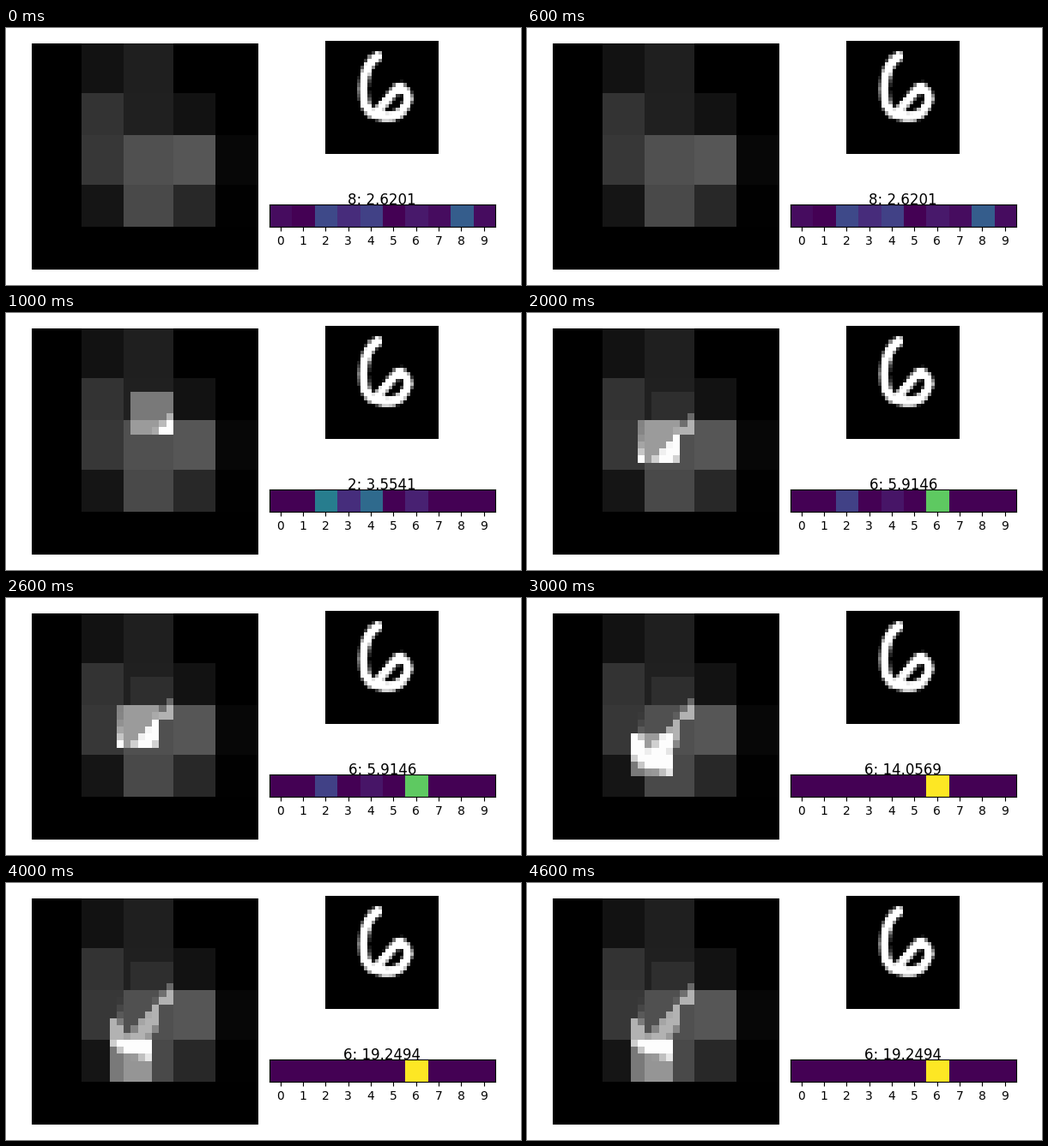
Recreate the animation shown at these times as a matplotlib script. Size 600x300 px, loop 5000 ms.

```python
import numpy as np
import matplotlib.pyplot as plt
from matplotlib.animation import FuncAnimation

N, COARSE, PATCH = 32, 5, 6
FLOOR, PEAK, LIFT = 46, 178, 75

# Pen path of the digit, in cell units (x, y)
PEN = np.array([
    (14.3, 3.9), (12.8, 5), (11.5, 7), (10.6, 10), (10.3, 13), (10.5, 15.8),
    (10.9, 17.8), (12.3, 19.8), (14.2, 20.5), (16.3, 21), (18.6, 20.9),
    (20.8, 19.8), (22.3, 17.8), (22.9, 15.8), (22.4, 14), (20.7, 12.6),
    (19.6, 13.2), (18.3, 14.6), (17.3, 16), (15.4, 18), (14.5, 19.4)])

# Top-left cell (x, y) of each glimpse after the coarse first look
GLIMPSES = [(14, 9), (12, 13), (11, 17), (11, 20)]

# Notable class scores per step; the best one is the title
SCORES = [
    {8: 2.6201, 2: 2.1, 4: 1.9, 3: 1.4, 6: 1.0, 0: 0.75, 7: 0.75, 9: 0.75},
    {2: 3.5541, 4: 3.0, 3: 1.45, 6: 1.15},
    {6: 5.9146, 2: 1.9, 4: 0.9},
    {6: 14.0569},
    {6: 19.2494},
]


def draw_digit():
    y, x = np.mgrid[:N, :N].astype(float)
    dist = np.full((N, N), np.inf)
    for (ax, ay), (bx, by) in zip(PEN[:-1], PEN[1:]):
        dx, dy = bx - ax, by - ay
        t = np.clip(((x - ax) * dx + (y - ay) * dy) / (dx**2 + dy**2), 0, 1)
        dist = np.minimum(dist, np.hypot(x - ax - t * dx, y - ay - t * dy))
    return np.clip((1.7 - dist) / 0.8, 0, 1)


def first_look(digit):
    """Shrink with a triangle filter, then enlarge to blocks again."""
    step = N / COARSE
    centers = (np.arange(COARSE)[:, None] + 0.5) * step
    k = np.clip(1 - np.abs(np.arange(N) + 0.5 - centers) / step, 0, 1)
    k /= k.sum(axis=1, keepdims=True)
    block = np.arange(N) * COARSE // N
    return PEAK * (k @ digit @ k.T)[np.ix_(block, block)]


def view(step):
    """Blocks sharpened at each glimpse so far, the current one lifted."""
    img = base.copy()
    for i, (x, y) in enumerate(GLIMPSES[:step], start=1):
        box = np.s_[y:y + PATCH, x:x + PATCH]
        img[box] = np.maximum(img[box], FLOOR + (PEAK - FLOOR) * digit[box])
        if i == step:
            img[box] += LIFT
    return img


def bars(step):
    return [[SCORES[step].get(c, 0) for c in range(10)]]


def caption(step):
    best = max(SCORES[step], key=SCORES[step].get)
    return f"{best}: {SCORES[step][best]:.4f}"


digit = draw_digit()
base = first_look(digit)

fig = plt.figure(figsize=(6, 3), dpi=100, facecolor="white")
grid = fig.add_gridspec(2, 2, left=0.05, right=0.95, bottom=0.05, top=0.95,
                        wspace=0.05, hspace=0.05)
view_ax = fig.add_subplot(grid[:, 0])
digit_ax = fig.add_subplot(grid[0, 1])
score_ax = fig.add_subplot(grid[1, 1])

view_ax.axis("off")
digit_ax.axis("off")
view_im = view_ax.imshow(view(0), cmap="gray", vmin=0, vmax=255,
                         interpolation="nearest")
digit_ax.imshow(digit, cmap="gray", vmin=0, vmax=1, interpolation="nearest")
score_im = score_ax.imshow(bars(0), cmap="viridis", vmin=0.5, vmax=7.7,
                           interpolation="nearest")
score_ax.set_xticks(range(10))
score_ax.set_yticks([])
title = score_ax.set_title(caption(0), fontsize=12, y=1, pad=0)


def update(step):
    view_im.set_data(view(step))
    score_im.set_data(bars(step))
    title.set_text(caption(step))
    return view_im, score_im, title


anim = FuncAnimation(fig, update, frames=len(SCORES), interval=1000,
                     repeat=True, repeat_delay=0, blit=False)
plt.show()
```
